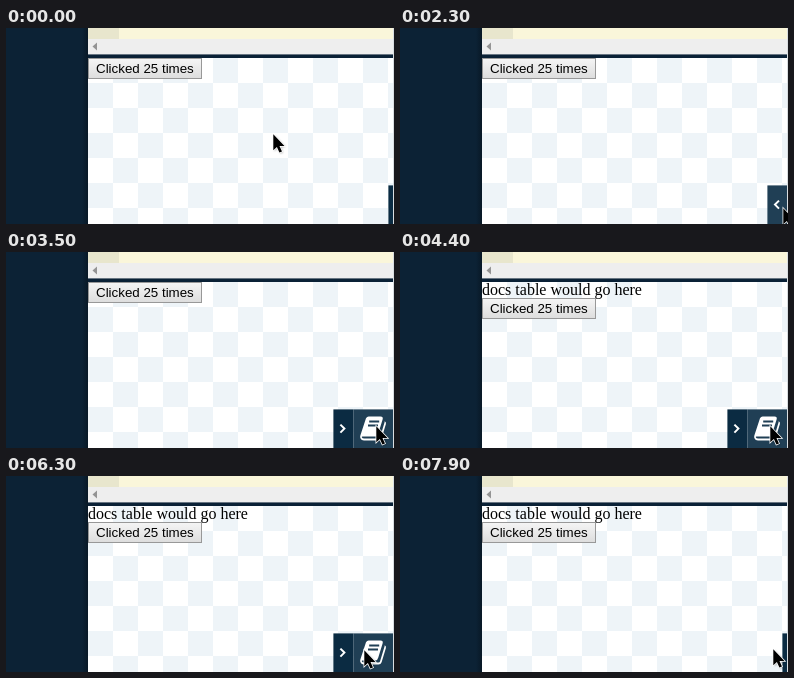
These frames come from a looping animation (388x196 px, 8000 ms). An HTML page:

```html
<!DOCTYPE html>
<html lang="en">
<head>
<meta charset="utf-8">
<title>Docs drawer</title>
<style>
  html, body { margin: 0; width: 100%; height: 100%; overflow: hidden; background: #fff; }
  svg { display: block; width: 388px; height: 196px; }
  .sans { font: 13.333px "Liberation Sans", Arial, sans-serif; }
  .serif { font: 16px "Liberation Serif", "Times New Roman", serif; }
</style>
</head>
<body>
<svg viewBox="0 0 388 196">
  <defs>
    <pattern id="checks" x="82" y="30" width="50" height="50" patternUnits="userSpaceOnUse">
      <rect width="50" height="50" fill="#fff"/>
      <path d="M25 0h25v25h-25zM0 25h25v25h-25z" fill="#eef4f8"/>
    </pattern>
    <linearGradient id="face" x2="0" y2="1">
      <stop stop-color="#f5f5f5"/><stop offset="1" stop-color="#dddddd"/>
    </linearGradient>
    <linearGradient id="shade">
      <stop stop-color="#081826" stop-opacity="0"/><stop offset="1" stop-color="#081826"/>
    </linearGradient>
    <filter id="blur" x="-50%" y="-50%" width="200%" height="200%"><feGaussianBlur stdDeviation="0.8"/></filter>
    <path id="arrow" d="M1.3 1.3v16l3.6-3.3 2.5 5.5 2.6-1.1-2.5-5.4h5z"/>
  </defs>

  <rect x="82" y="30" width="306" height="166" fill="url(#checks)"/>
  <rect x="82" width="306" height="11" fill="#faf6da"/>
  <rect x="82" width="31" height="11" fill="#e8e6cd"/>
  <rect x="82" y="11" width="306" height="15.4" fill="#eeeeee"/>
  <path d="M91 14.5v8l-4.5-4z" fill="#949494"/>
  <rect width="82" height="196" fill="#0c2235"/>
  <rect x="76" width="6" height="196" fill="url(#shade)"/>
  <rect x="82" y="26.4" width="306" height="3.6" fill="#0a2136"/>

  <text id="docs" class="serif" x="82" y="43">docs table would go here</text>
  <g id="button">
    <rect x="82.5" y="30.5" width="113" height="20" fill="url(#face)" stroke="#989898"/>
    <text class="sans" x="90" y="45">Clicked 25 times</text>
  </g>

  <g id="drawer">
    <rect id="tab" y="157" width="20" height="40"/>
    <rect id="book" x="20" y="157" width="40" height="40"/>
    <path id="chevron" fill="none" stroke="#fff" stroke-width="2"/>
    <g transform="translate(26.6 164.1)">
      <path fill="#fff" d="M8.6 0H20.5Q23.5 0 22.6 2.9L18.3 17Q17.4 20 15.6 20H2.4Q1.5 20.2 1.9 21Q2.4 22 4.1 22H18.5Q19.7 22 20 21L24.6 5.7V4.8Q26.4 5.5 25.9 7.5L21.6 21.7Q20.8 24 18.5 24H4.1Q1 24 .2 21Q0 19.5 .5 18.5L6 1.8Q7 0 8.6 0z"/>
      <path id="lines" d="M9.2 5h10M8 9h10" stroke-width="1.9"/>
    </g>
  </g>
  <rect x="387" width="1" height="196" fill="#d9dde0"/>

  <g id="cursor">
    <use href="#arrow" x="1" y="1" opacity=".35" filter="url(#blur)"/>
    <use href="#arrow" fill="#000" stroke="#fff" stroke-width="1.5" paint-order="stroke"/>
  </g>
</svg>
<script>
  const LOOP = 8000, TICK = 100;
  const LEAD = 90; // the pointer is ahead of the drawn cursor by almost a tick
  const IDLE = "#0b2b42", HOVER = "#203f55";
  const SHUT = 382, PEEK = 367, OPEN = 327;
  const $ = id => document.getElementById(id);

  const glides = [
    { end: 1100, ms: 500, to: [375, 198] },
    { end: 1700, ms: 300, to: [378, 184] },
    { end: 2100, ms: 200, to: [382, 179] },
    { end: 3500, ms: 400, to: [369, 173] },
    { end: 5300, ms: 100, to: [364, 172] },
    { end: 5500, ms: 200, to: [259, 165] },
    { end: 5800, ms: 200, to: [248, 163] },
    { end: 6100, ms: 300, to: [305, 165] },
    { end: 6300, ms: 10, to: [357, 173] },
    { end: 6700, ms: 300, to: [335, 171] },
    { end: 7700, ms: 500, to: [372, 172] }
  ];
  const slides = [
    { end: 2300, ms: 300, to: [PEEK] },
    { end: 3200, ms: 300, to: [OPEN] },
    { end: 7200, ms: 300, to: [SHUT] }
  ];

  const smooth = p => p * p * (3 - 2 * p);
  const easeOut = p => 1 - Math.pow(1 - p, 1.7);
  const within = (v, a, b) => v >= a && v < b;

  // Runs through the moves in turn, each starting where the one before ended.
  function follow(moves, from, t, ease) {
    return moves.reduce((at, { end, ms, to }) => {
      const p = Math.min(1, Math.max(0, (t - end + ms) / ms));
      return at.map((v, i) => v + (to[i] - v) * ease(p));
    }, from).map(Math.round);
  }
  const pointer = t => follow(glides, [266, 105], t, smooth);

  function draw(t) {
    const [x, y] = pointer(t);
    const [left] = follow(slides, [SHUT], t, easeOut);
    const reach = pointer(t + LEAD)[0] + 1 - left;
    const bookFill = within(reach, 20, 60) ? HOVER : IDLE;
    const docsOpen = t >= 3900;

    $("cursor").setAttribute("transform", `translate(${x} ${y})`);
    $("drawer").setAttribute("transform", `translate(${left + 0.4} 0.4)`);
    $("tab").setAttribute("fill", within(reach, 0, 20) ? HOVER : IDLE);
    $("book").setAttribute("fill", bookFill);
    $("lines").setAttribute("stroke", bookFill);
    $("chevron").setAttribute("d", within(t, 2900, 6900)
      ? "M7 172.2l4 4-4 4" : "M11.6 172.2l-4 4 4 4");
    $("docs").setAttribute("visibility", docsOpen ? "visible" : "hidden");
    $("button").setAttribute("transform", `translate(0 ${docsOpen ? 16 : 0})`);
  }

  const begin = performance.now();
  function frame() {
    const t = (performance.now() - begin) % LOOP;
    draw(Math.floor(t / TICK) * TICK);
    requestAnimationFrame(frame);
  }
  frame();
</script>
</body>
</html>
```
